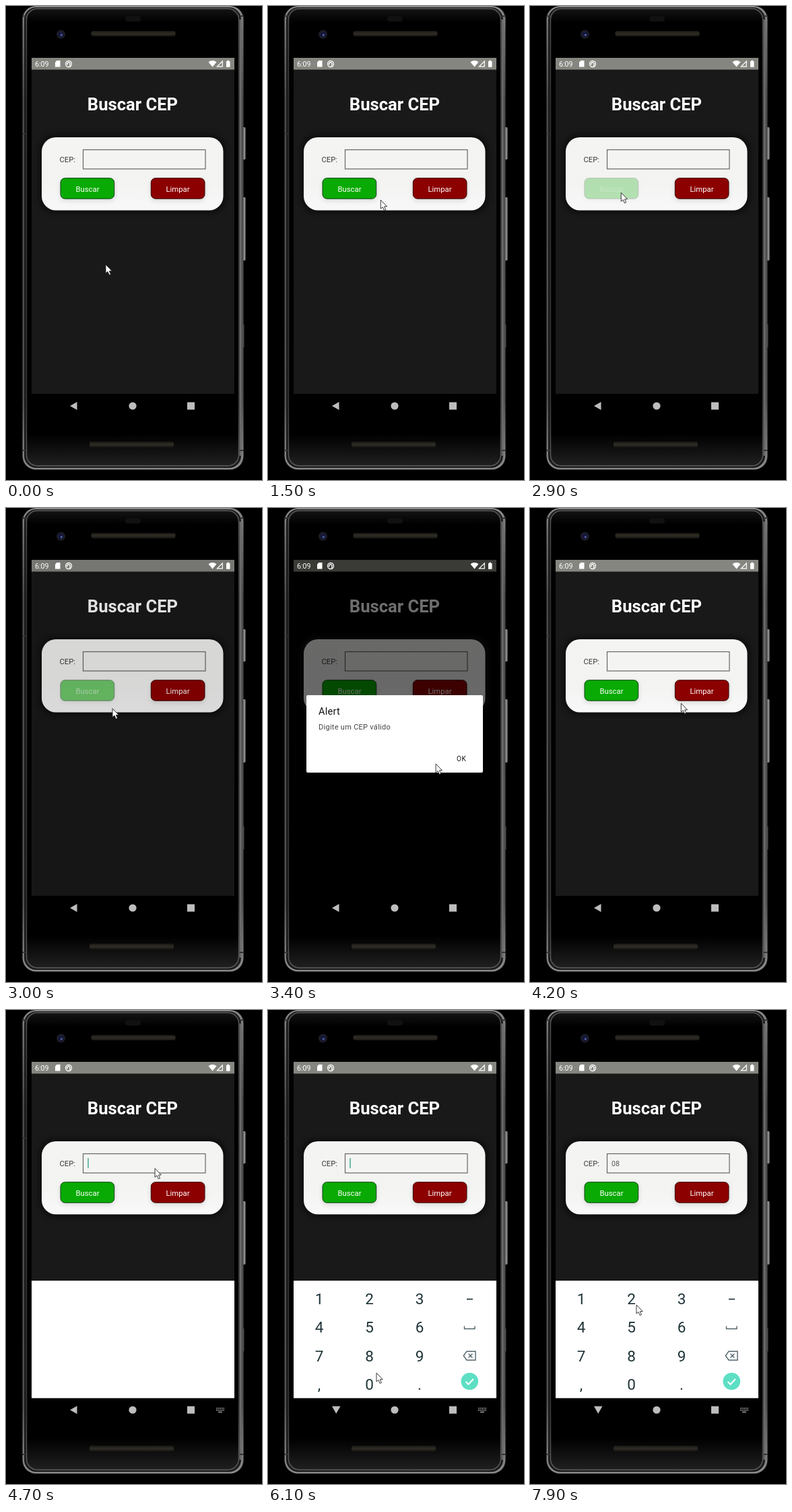
Write an HTML page that moves like this. It is 380x704 px and loops after 8000 ms.

```html
<!DOCTYPE html>
<html lang="pt">
<head>
<meta charset="utf-8">
<title>Buscar CEP</title>
<style>
html, body { margin: 0; width: 100%; height: 100%; overflow: hidden; background: #000; }
svg { display: block; font-family: Roboto, sans-serif; }
.mid { text-anchor: middle; }
.soft { filter: blur(3px); }
.worn { filter: blur(.5px); }
#keys text { font-size: 22.5px; fill: #1f3338; text-anchor: middle; }
</style>
</head>
<body>
<svg width="380" height="704" viewBox="0 0 380 704">
  <defs>
    <linearGradient id="rim" x2="0" y2="1">
      <stop offset="0" stop-color="#8c8c8c"/><stop offset=".05" stop-color="#707070"/><stop offset=".2" stop-color="#4a4a4a"/>
      <stop offset=".85" stop-color="#505050"/><stop offset="1" stop-color="#8a8a8a"/>
    </linearGradient>
    <linearGradient id="body" x2="0" y2="1">
      <stop offset="0" stop-color="#141414"/><stop offset=".03" stop-color="#000"/>
      <stop offset=".93" stop-color="#000"/><stop offset="1" stop-color="#202020"/>
    </linearGradient>
    <linearGradient id="bar" x2="0" y2="1">
      <stop offset="0" stop-color="#181713"/><stop offset=".5" stop-color="#302d26"/><stop offset="1" stop-color="#181713"/>
    </linearGradient>
    <linearGradient id="paper" x2="0" y2="1">
      <stop offset="0" stop-color="#f4f4f2"/><stop offset=".6" stop-color="#f3f3f2"/><stop offset="1" stop-color="#f8f8f8"/>
    </linearGradient>
    <clipPath id="view"><rect x="38" y="77" width="301" height="499"/></clipPath>
  </defs>

  <!-- Phone -->
  <g class="worn">
    <g fill="#8a8a8a">
      <rect x="351" y="180" width="4.5" height="48" rx="1.5"/>
      <rect x="351" y="284" width="4.5" height="94" rx="1.5"/>
      <rect x="350" y="473" width="3.5" height="34" fill="#444"/>
    </g>
    <rect x="24.5" y="0" width="328" height="688.5" rx="20" fill="url(#rim)"/>
    <rect x="27" y="2" width="322" height="684" rx="18" fill="#1b1b1b"/>
    <path d="M348 20V668" stroke="#6a6a6a" stroke-width="3"/>
    <rect x="30.5" y="4" width="315" height="679" rx="16" fill="url(#body)" stroke="url(#rim)" stroke-opacity=".6" stroke-width="1.5"/>
    <path d="M24 15h6M24 190h5M24 660h6M347 15h6M347 660h6" stroke="#333" stroke-width="2"/>
  </g>
  <rect x="177" y="15" width="23" height="8" rx="4" fill="#111"/>
  <rect x="126.5" y="37" width="125" height="8" rx="3" fill="url(#bar)"/>
  <rect x="124" y="647" width="125" height="8.5" rx="3" fill="url(#bar)"/>
  <circle cx="81.5" cy="42" r="6.5" fill="#1c1c28"/>
  <circle cx="81.5" cy="42" r="3.8" fill="#14183c"/>
  <circle cx="82.3" cy="43" r="1.5" fill="#5966a8"/>

  <!-- App -->
  <g clip-path="url(#view)">
    <rect id="screen" x="38" y="77" width="301" height="499"/>
    <g id="ghost">
      <rect x="41" y="186" width="295" height="129" rx="28" fill="#1e1e1e"/>
      <rect x="57" y="278" width="262" height="115" fill="#1e1e1e"/>
      <text x="280" y="376" font-size="10" fill="#080808" letter-spacing=".5">OK</text>
    </g>
    <rect x="38" y="77" width="301" height="17.5" fill="#868681"/>
    <text class="mid" x="188" y="155" font-size="25.6" font-weight="700" fill="#fff">Buscar CEP</text>
    <rect id="glow" class="soft" x="48" y="190" width="280" height="119" rx="25" fill="#101010"/>
    <rect x="53" y="195" width="269.5" height="108.5" rx="21" fill="url(#paper)"/>
    <text x="79.5" y="232" font-size="11.2" fill="#383838">CEP:</text>
    <rect x="114.5" y="213.5" width="181.5" height="28.5" fill="#f4f4f2" stroke="#666" stroke-width="1.2"/>
    <g id="search">
      <rect class="soft" x="80" y="257" width="82" height="33" rx="8" opacity=".1"/>
      <rect x="81" y="255.7" width="79.7" height="30.5" rx="6.5" fill="#09aa03" stroke="#0d4210"/>
      <text id="searchLabel" class="mid" x="121" y="275.5" font-size="11.3" fill="#fff">Buscar</text>
    </g>
    <rect class="soft" x="214" y="257" width="82" height="33" rx="8" opacity=".1"/>
    <rect x="215.3" y="255.7" width="79.7" height="30.5" rx="6.5" fill="#8c0000" stroke="#380808"/>
    <text class="mid" x="255" y="275.5" font-size="11.3" fill="#fff">Limpar</text>
    <text id="typed" x="121" y="231.5" font-size="10.5" fill="#555"></text>
    <rect id="caret" y="220" width="1.4" height="15" fill="#35a58c"/>
    <rect id="dim" x="38" y="77" width="301" height="499"/>
    <g fill="#fff">
      <text x="43" y="90" font-size="10.7">6:09</text>
      <path d="M75.5 81H80.5V90.5H73V83.5Z"/>
      <circle cx="93" cy="86" r="4.5" fill="none" stroke="#fff" stroke-width="1.3"/>
      <path d="M91 87.5a2.3 2.3 0 1 1 3.5 .3L96 90" fill="none" stroke="#fff" stroke-width="1.3"/>
      <path d="M300.5 83.3Q306.5 78.7 312.5 83.3L306.5 90.5Z"/>
      <path d="M313.5 89.8H321.3V82Z" fill="none" stroke="#fff" stroke-width="1.2"/>
      <path d="M327 82h1.5v-1.2h2.5V82h1.5v8.7H327Z"/>
    </g>
    <g id="alert">
      <rect x="57" y="278" width="262" height="115" rx="2" fill="#fff"/>
      <text x="75" y="306.5" font-size="14.5" letter-spacing=".25" fill="#111">Alert</text>
      <text x="75" y="329" font-size="11" letter-spacing=".28" fill="#444">Digite um CEP válido</text>
      <text x="280" y="376" font-size="10" letter-spacing=".5" fill="#111">OK</text>
    </g>
  </g>

  <!-- Keyboard -->
  <g id="board">
    <rect x="38" y="402" width="301" height="174.5" fill="#fff"/>
    <path d="M312 591.5h12M312 594.3h12" stroke="#999" stroke-width="1.7" stroke-dasharray="1.7 .9"/>
    <path d="M315 597.2h6" stroke="#999" stroke-width="1.5"/>
    <g id="keys">
      <g id="labels"></g>
      <g fill="none" stroke="#50636a" stroke-width="1.4">
        <path d="M295 429.5h9" stroke="#1f3338" stroke-width="1.7"/>
        <path d="M291.5 469.5v4h15.5v-4"/>
        <path d="M295 507h13v13h-13l-4.7-6.5ZM297.5 510.5l6 6m0-6l-6 6"/>
      </g>
      <circle cx="299.3" cy="551.5" r="12.8" fill="#5ddfc4"/>
      <path d="M293.5 552l4 4 7.5-8" fill="none" stroke="#fff" stroke-width="2"/>
    </g>
  </g>

  <!-- Navigation -->
  <g fill="#bdbdbd">
    <path id="back" d="M95 594L105.5 588V600Z"/>
    <path id="hide" d="M95 588.5H107.5L101.2 599.5Z"/>
    <circle cx="188" cy="594" r="5.6"/>
    <rect x="269" y="588.5" width="11" height="11"/>
  </g>
  <path id="cursor" d="M0 0V13L3 10.5L5.2 15.5L7.5 14.5L5.3 9.7H9.3Z" fill="#fff" stroke="#222" stroke-width=".9"/>
</svg>
<script>
const LOOP = 8000;
const el = id => document.getElementById(id);
const show = (id, on) => el(id).style.display = on ? '' : 'none';

['123', '456', '789', ',0.'].forEach((row, r) => [...row].forEach((char, c) => {
  const label = document.createElementNS('http://www.w3.org/2000/svg', 'text');
  label.setAttribute('x', 76 + c * 74.5);
  label.setAttribute('y', 437 + r * 42.3);
  label.textContent = char;
  el('labels').append(label);
}));

// Each stop is [time, ...values]; values between stops are linear.
const pointer = [
  [100, 148, 384], [400, 272, 480], [500, 190, 407], [600, 130, 358], [750, 70, 303], [1000, 152, 257],
  [1300, 178, 272], [1600, 162, 296], [1900, 142, 284], [2400, 135, 280], [2600, 135, 277],
  [2900, 135, 277], [3400, 249, 380], [3700, 286, 374], [3900, 286, 374], [4100, 226, 318],
  [4400, 221, 235], [4700, 221, 235], [5500, 262, 470], [5800, 225, 525], [6100, 161, 539],
  [6400, 152, 554], [6800, 152, 554], [7000, 153, 516], [7500, 153, 516], [7700, 161, 478], [7900, 158, 438]
];
const dimming = [[2950, 0], [3200, .57], [3950, .57], [4100, .2], [4200, 0]];
const press = [[2550, 1], [2700, .27], [2900, .27], [3150, 1]];

function sample(stops, t) {
  const next = stops.findIndex(stop => stop[0] > t);
  if (next < 0) return stops.at(-1).slice(1);
  if (next === 0) return stops[0].slice(1);
  const a = stops[next - 1], b = stops[next];
  const k = (t - a[0]) / (b[0] - a[0]);
  return a.slice(1).map((v, i) => v + (b[i + 1] - v) * k);
}

function draw(t) {
  const [pressed] = sample(press, t);
  el('cursor').setAttribute('transform', `translate(${sample(pointer, t)})`);
  el('dim').setAttribute('opacity', sample(dimming, t)[0]);
  el('search').setAttribute('opacity', pressed);
  el('searchLabel').setAttribute('opacity', pressed);
  el('screen').setAttribute('fill', t >= 3050 && t < 4200 ? '#000' : '#191919');
  const closing = t >= 4000 && t < 4200;
  show('ghost', closing);
  show('glow', !closing);
  show('alert', t >= 3050 && t < 4000);

  show('board', t >= 4700);
  show('keys', t >= 4800);
  show('back', t < 4800);
  show('hide', t >= 4800);

  const text = t < 6500 ? '' : t < 7200 ? '0' : '08';
  const lastInput = [4700, 6500, 7200][text.length];
  el('typed').textContent = text;
  el('caret').setAttribute('x', 121.3 + text.length * 6);
  show('caret', t >= 4700 && (t - lastInput) % 1000 < 500);
}

const start = performance.now();
function tick() {
  draw((performance.now() - start) % LOOP);
  requestAnimationFrame(tick);
}
tick();
</script>
</body>
</html>
```
